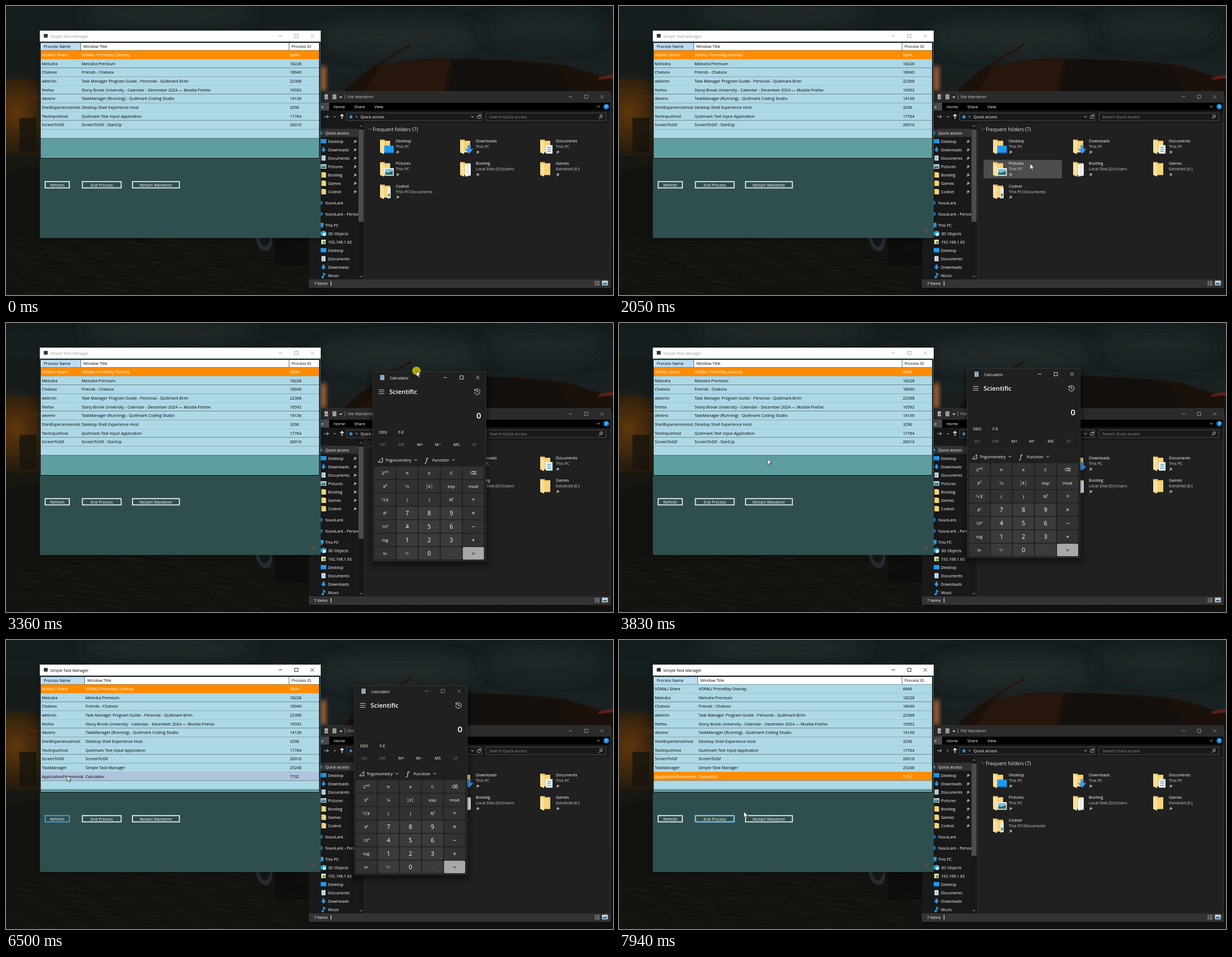
An HTML page that plays this animation: 1084 by 517 pixels, repeating every 8 s.

```html
<!DOCTYPE html>
<html lang="en">
<head>
<meta charset="utf-8">
<title>Simple Task Manager</title>
<style>
html, body { margin: 0; width: 100%; height: 100%; overflow: hidden; background: #0d1111; }
svg { display: block; width: 100vw; height: 100vh; }
text { font-family: "Open Sans", "Noto Sans", "DejaVu Sans", sans-serif; white-space: pre; }
.math { font-family: "Noto Serif", "DejaVu Sans", serif; font-style: italic; }
.row rect { fill: #add8e6; }
.row text { fill: #000; }
.row.hot rect { fill: #b0c4de; }
.row.sel rect { fill: #ff8c00; }
.row.sel text { fill: #fff; }
.btn .edge { fill: none; stroke: #e6eaea; stroke-width: 1.8; }
.btn .halo { fill: none; stroke: none; stroke-width: 1; }
.btn.focus .edge { stroke: #4aa0e6; }
.btn.hot .edge { stroke: #fff; }
.btn.hot .halo { stroke: #2f8fdf; }
.item > rect { fill: none; }
.item.hot > rect { fill: #4d4d4d; }
</style>
</head>
<body>
<svg id="stage" viewBox="0 0 1084 517" preserveAspectRatio="none">
<defs>
  <linearGradient id="sky" x2="0" y2="1">
    <stop offset="0" stop-color="#141c1d"/><stop offset=".22" stop-color="#1a2122"/>
    <stop offset=".55" stop-color="#171711"/><stop offset="1" stop-color="#11120f"/>
  </linearGradient>
  <radialGradient id="amber"><stop offset="0" stop-color="#8a4a0c" stop-opacity=".6"/><stop offset="1" stop-color="#8a4a0c" stop-opacity="0"/></radialGradient>
  <filter id="soft" x="-50%" y="-50%" width="200%" height="200%"><feGaussianBlur stdDeviation="4"/></filter>
  <filter id="haze" x="-50%" y="-100%" width="200%" height="300%"><feGaussianBlur stdDeviation="16"/></filter>
  <clipPath id="side"><rect x="541" y="209" width="88" height="280"/></clipPath>
</defs>
<g id="scene"></g>
</svg>
<script>
const R = (x, y, w, h, fill, more = '') => `<rect x="${x}" y="${y}" width="${w}" height="${h}" fill="${fill}" ${more}/>`;
const P = (d, fill, stroke = 'none', w = 1, more = '') => `<path d="${d}" fill="${fill}" stroke="${stroke}" stroke-width="${w}" ${more}/>`;
const C = (x, y, r, fill, more = '') => `<circle cx="${x}" cy="${y}" r="${r}" fill="${fill}" ${more}/>`;
const E = (x, y, rx, ry, fill, more = '') => `<ellipse cx="${x}" cy="${y}" rx="${rx}" ry="${ry}" fill="${fill}" ${more}/>`;
const T = (x, y, s, fill = '#fff', size = 7.2, more = '') =>
  `<text x="${x}" y="${y + size * .36}" font-size="${size}" fill="${fill}" ${more}>${s}</text>`;
const G = (s, more = '') => `<g ${more}>${s}</g>`;
const at = (x, y, s) => G(s, `transform="translate(${x} ${y})"`);
const line = (d, color, w = 1) => P(d, 'none', color, w);
const MID = 'text-anchor="middle"';

function wallpaper() {
  let s = R(0, 0, 1084, 517, 'url(#sky)');
  const haze = 'filter="url(#haze)"';
  s += E(290, 14, 160, 18, '#232b2b', haze) + E(700, 55, 150, 28, '#20292a', haze) + E(960, 40, 110, 30, '#1d2526', haze);
  s += R(0, 62, 62, 78, '#151b1a') + P('M0 132H62V268H0Z', '#241b0d');
  s += E(18, 190, 60, 75, 'url(#amber)');
  s += R(0, 160, 62, 6, '#4b2a0a', 'opacity=".6"') + R(24, 200, 30, 62, '#17140d', 'opacity=".8"');
  s += R(475, 36, 35, 8, '#1a2021') + R(561, 108, 10, 44, '#bd6a3a', 'filter="url(#soft)"');
  s += P('M603 153Q640 112 724 67L722 72Q690 88 668 108Q730 92 790 94Q940 96 1000 106L1084 132V160H603Z', '#1b110b');
  s += P('M668 108Q735 93 794 95L782 153H640Z', '#27160c') + P('M800 96Q930 97 985 110L1010 153H790Z', '#120f0c');
  s += line('M662 106L724 67L722 73', '#2d190d', 2) + P('M1058 128L1084 122V129L1058 132Z', '#5b2114');
  s += P('M0 300Q40 285 62 290V517H0Z', '#12130f') + P('M0 415H541V517H0Z', '#131410');
  // wet cobbles
  for (let i = 0; i < 70; i++) {
    const x = (i * 97) % 540 - 10, y = 418 + (i * 37) % 98;
    s += line(`M${x} ${y}q12 -5 24 0t22 1`, i % 2 ? '#1d1d17' : '#0b0d0b', 1.5);
  }
  s += E(460, 412, 15, 27, '#272c2e', 'transform="rotate(-12 460 412)"') + E(462, 410, 10, 20, '#141719');
  return s + R(480, 415, 62, 50, '#0b0b0a', 'opacity=".7"');
}

const caption = (xs, y, color, k = 3) =>
  line(`M${xs[0] - k} ${y}h${2 * k}M${xs[1] - k} ${y - k}h${2 * k}v${2 * k}h${-2 * k}ZM${xs[2] - k} ${y - k}l${2 * k} ${2 * k}m0 ${-2 * k}l${-2 * k} ${2 * k}`, color, .8);
const chevron = (x, y, color = '#ddd', k = 2.5) => line(`M${x - k} ${y - k / 2}l${k} ${k}l${k} ${-k}`, color);
const pin = (x, y) => at(x, y, P('M-1 -3L3 1L1 1L-1 3L-3 -1L-1 -1Z', '#aaa') + line('M-1 1L-3.5 3.5', '#aaa', .8));

const star = P('M0 -4L1.2 -1.3L4 -1L1.8 .8L2.6 4L0 2.3L-2.6 4L-1.8 .8L-4 -1L-1.2 -1.3Z', '#39a0ee');
const arrow = P('M-1.6 -4.5H1.6V-.5H4.5L0 4.5L-4.5 -.5H-1.6Z', '#3b9af0');
const screen = R(-5, -4, 10, 8, '#1e9bf0') + R(-5, 3, 10, 1, '#0d6bb5');
const page = R(-3.5, -4.5, 7, 9, '#eef4f8') + line('M-2 -2H2M-2 0H2M-2 2H2', '#4aa3d0', .9);
const photo = R(-5, -4, 10, 8, '#f2f6f8') + R(-4, -3, 8, 6, '#79bfe8') + P('M-4 3V0L-1 1L4 -1V3Z', '#35695a');
const dir = R(-4, -5, 6, 10, '#e3b64e') + R(-3, -4, 7.5, 9, '#fbdc83');
const icons = {
  star, arrow, screen, page, photo, dir,
  cloud: C(0, 0, 3.5, '#1582d8'),
  pc: R(-5, -4, 10, 7, '#3aa7e8') + R(-3, 4, 6, 1, '#bbb'),
  cube: P('M0 -5L5 -3V3L0 5L-5 3V-3Z', '#31b3e3') + R(-1, -1, 5, 5, '#eaf7fc'),
  server: R(-4, -4, 8, 8, '#f3e5ad') + C(1, 1, 2.5, '#49ae57'),
  note: C(-1.5, 3, 2, '#2aa4ee') + line('M0 3V-4Q3 -3 3 0', '#2aa4ee', 1.6)
};

const sidebar = [
  ['Quick access', 'star', 227, 1], ['Desktop', 'screen', 242, 2, 1], ['Downloads', 'arrow', 257, 2, 1],
  ['Documents', 'page', 272, 2, 1], ['Pictures', 'photo', 287, 2, 1], ['Bootleg', 'dir', 302, 2, 1],
  ['Games', 'dir', 317, 2, 1], ['Codnel', 'dir', 332, 2, 1], ['NuvoLark', 'cloud', 352, 1],
  ['NuvoLark - Personal', 'cloud', 372, 1], ['This PC', 'pc', 392, 1], ['3D Objects', 'cube', 407, 2],
  ['192.168.1.62', 'server', 422, 2], ['Desktop', 'screen', 437, 2], ['Documents', 'page', 452, 2],
  ['Downloads', 'arrow', 467, 2], ['Music', 'note', 482, 2]
];
const folders = [
  ['Desktop', 'This PC', 'screen'], ['Downloads', 'This PC', 'arrow'], ['Documents', 'This PC', 'page'],
  ['Pictures', 'This PC', 'photo'], ['Bootleg', 'Local Disk (D:)\\Users', 'blank'], ['Games', 'Extrahdd (E:)', ''],
  ['Codnel', 'This PC\\Documents', 'files']
];
const cols = [651, 794, 937];

function bigFolder(kind) {
  let s = P('M-12 -13H-4L-3 -11H6V10H-12Z', '#e9bf5c') + P('M-12 -13L-5 -9V13L-12 10Z', '#fbe09a') + P('M-5 -9L6 -11V10H-5Z', '#f6d37a');
  if (kind === 'blank') s += P('M-3 -8L7 -10V11L-3 13Z', '#f4f4f2') + line('M2 -9V12', '#ccc', .8);
  else if (kind === 'files') s += P('M1 -6L7 -8V11L1 12Z', '#e9edf0') + R(2, 3, 4, 5, '#5f9b80');
  else if (kind) s += G(icons[kind], 'transform="translate(4 4.5) scale(1.7)"');
  return s;
}

function fileWindow() {
  let s = R(541.5, 153, 538, 350.5, '#202020', 'stroke="#3a3a3a"');
  s += R(542, 153, 537, 20, '#2b2b2b') + R(542, 173, 537, 14, '#000') + R(542, 187, 537, 22, '#191919');
  s += R(569, 158, 6, 9, '#ababab') + line('M570.5 163l1.5 1.5l2.5 -3', '#444') + R(583, 158, 7, 9, '#999');
  s += P('M595.5 162h5l-2.5 3Z', '#ddd') + line('M605.5 158v9', '#777') + T(610, 162.5, 'File Wanderer', '#c8c8c8');
  s += caption([1008, 1036, 1064], 162.5, '#a5a5a5');
  s += R(542, 173, 35, 14, '#4a4a4a') + T(563, 180, 'e');
  s += T(585, 180, 'Home') + T(622, 180, 'Share') + T(658, 180, 'View');
  s += chevron(1058, 180) + C(1072, 180, 5, '#1683d8') + T(1072, 180, '?', '#fff', 7.5, MID + ' font-weight="700"');
  s += line('M568 198h8m-3 -3l3 3l-3 3', '#ccc') + chevron(587, 198, '#ccc', 2) + line('M600 202v-8m-3 3l3 -3l3 3', '#fff', 1.3);
  s += R(608.5, 191.5, 241, 13.5, '#191919', 'stroke="#4d4d4d"') + at(616, 198, star) + line('M625 196l2 2l-2 2', '#ddd') + T(633, 198, 'Quick access');
  s += chevron(833, 198) + line('M847 196.5a3 3 0 1 0 .5 2.5M847.5 194v3h-3', '#ccc');
  s += R(857.5, 191.5, 214, 13.5, '#191919', 'stroke="#4d4d4d"') + T(863, 198, 'Search Quick access', '#929292');
  s += C(1063, 197, 2.3, 'none', 'stroke="#ccc"') + line('M1061.5 199l-3 3', '#ccc');

  let side = R(541, 209, 88, 280, '#191919') + R(541, 219.5, 88, 14.5, '#333');
  for (const [name, icon, y, level, pinned] of sidebar) {
    side += at(level === 1 ? 562 : 567, y, icons[icon]) + T(level === 1 ? 570 : 575, y, name);
    if (pinned) side += pin(624, y);
  }
  s += G(side, 'clip-path="url(#side)"');
  s += R(629, 209, 10, 280, '#171717') + R(629.5, 221, 9, 165, '#4d4d4d') + line('M631.5 216l2.5 -2.5l2.5 2.5', '#aaa') + chevron(634, 484, '#aaa');
  s += line('M640.5 209v280', '#2d2d2d') + chevron(650, 220.5, '#777', 3) + T(655, 221, 'Frequent folders (7)', '#e6e6e6', 8.8);
  folders.forEach(([name, place, kind], i) => {
    const x = cols[i % 3], y = 235 + 40.3 * Math.floor(i / 3), tx = x + 45;
    s += G(R(x, y, 140, 33, '') + at(x + 29, y + 17, bigFolder(kind)) +
      T(tx, y + 6.5, name) + T(tx, y + 16.5, place, '#d0d0d0') + pin(tx + 4, y + 26), 'class="item"');
  });
  s += R(542, 489, 537, 14, '#333') + T(550, 496, '7 items') + line('M580.5 492v8', '#fff');
  s += line('M1051 493h3m1 0h5M1051 496h3m1 0h5M1051 499h3m1 0h5', '#ccc') + R(1065, 492, 9, 7, '#8ecbee', 'stroke="#fff"') + R(1066, 496, 7, 2, '#346');
  return s;
}

const tasks = [
  ['VORALI Share', 'VORALI PrimeRay Overlay', 6664], ['Melodra', 'Melodra Premium', 18228],
  ['Chatvox', 'Friends - Chatvox', 18040], ['wbbrim', 'Task Manager Program Guide - Personal - Quillmark Brim', 22368],
  ['firefox', 'Stony Brook University - Calendar - December 2024 — Mozilla Firefox', 16592],
  ['devenv', 'TaskManager (Running) - Quillmark Coding Studio', 14136],
  ['ShellExperienceHost', 'Desktop Shell Experience Host', 3296],
  ['TextInputHost', 'Quillmark Text Input Application', 17764], ['ScreenToGif', 'ScreenToGif - StartUp', 26016]
];
const refreshed = [...tasks.slice(0, 8), ['ScreenToGif', 'ScreenToGif', 26016],
  ['TaskManager', 'Simple Task Manager', 25248], ['ApplicationFrameHost', 'Calculator', 7732]];
const TOP = 79.5, PITCH = 15.66;

function table(rows, split, id) {
  let s = R(61.5, 65.5, 498, 207, '#5f9ea0', 'stroke="#111"') + R(62, 66, 497, 13.5, '#fff') + R(63, 66, split - 63, 13.5, '#bcdcf4');
  s += T(67.5, 72.5, 'Process Name', '#000') + T(split + 5, 72.5, 'Window Title', '#000') + T(510, 72.5, 'Process ID', '#000');
  s += line(`M${split + .5} 66v13M505.5 66v13M62 79.5h497`, '#3a4a50', .8);
  [...rows, ['', '', '']].forEach(([name, title, pid], i) => {
    const y = TOP + PITCH * i, m = y + 8;
    s += G(R(62, y, 497, PITCH, '') + T(64, m, name) + T(split + 2, m, title) + T(507, m, pid) +
      line(`M62 ${Math.floor(y + PITCH) + .5}h497`, '#5e737b'), 'class="row"');
  });
  return G(s, `id="${id}"`);
}

const buttons = [['Refresh', 69, 45], ['End Process', 135.5, 71], ['Restart Wanderer', 225, 85.5]];
function taskWindow() {
  let s = R(60, 46, 503, 371, '#000', 'opacity=".25" filter="url(#soft)"') + R(60.5, 44, 501.5, 371, '#2f4f4f') + R(60.5, 44, 501.5, 19.5, '#fff');
  s += R(67.5, 50, 7, 6.5, '#333');
  for (const [id, color] of [['idle', '#999'], ['active', '#000']])
    s += G(T(79, 54, 'Simple Task Manager', color, 6.95) + caption([490, 518.5, 547], 53.5, color), `id="${id}"`);
  s += table(tasks, 133, 'before') + table(refreshed, 140, 'after');
  for (const [name, x, w] of buttons)
    s += G(R(x + .9, 314.2, w - 1.8, 11.2, '', 'class="edge"') + R(x + .5, 313.8, w - 1, 12, '', 'class="halo"') +
      T(x + w / 2, 320, name, '#fff', 7.1, MID), 'class="btn"');
  return s;
}

const sup = (a, b) => `${a}<tspan dy="-2.5" font-size="5.5">${b}</tspan>`;
const frac = (a, b) => `<tspan dy="-1.5" font-size="6">${a}</tspan><tspan dy="1.5">⁄</tspan><tspan font-size="6">${b}</tspan>`;
const keys = [sup('2', 'nd'), 'π', 'e', 'C', '⌫', sup('x', '2'), frac('1', 'x'), '|x|', 'exp', 'mod',
  '<tspan dy="-2" font-size="5">2</tspan><tspan dy="2">√x</tspan>', '(', ')', 'n!', '÷', sup('x', 'y'), 7, 8, 9, '×', sup('10', 'x'), 4, 5, 6, '−',
  'log', 1, 2, 3, '+', 'ln', frac('+', '−'), 0, '.', '='];
const mathKeys = [5, 7, 10, 13, 15];

function calculator() {
  let s = R(-4, 2, 210, 346, '#000', 'opacity=".4" filter="url(#soft)"') + R(0, 0, 201.5, 338.5, '#202020', 'stroke="#3c3c3c" stroke-width=".8"');
  s += R(13, 6, 7, 9, '#c5d3dc') + R(14, 7, 5, 2, '#2b8fd6') + line('M14 11h5M14 13h5', '#567', 1);
  s += T(30, 11, 'Calculator') + G(caption([129, 158, 187], 10.5, '#fff'), 'id="calcCaption"');
  s += line('M10 32.5h10M10 36h10M10 39.5h10', '#ddd', .9) + T(29, 36, 'Scientific', '#fff', 11.5, 'font-weight="600"');
  s += line('M182 33a5 5 0 1 1 -1 3M181.5 31v3h3M186 33v3.5h2.5', '#ddd', 1);
  s += T(193, 78.5, '0', '#fff', 15, 'text-anchor="end" font-weight="600"') + T(10.5, 108.5, 'DEG') + T(45, 108.5, 'F-E');
  ['MC', 'MR', 'M+', 'M−', 'MS', 'M˅'].forEach((k, i) => s += T([18, 50.5, 84, 116, 149, 182][i], 130, k, i < 2 || i > 4 ? '#777' : '#fff', 7.5, MID));
  s += line('M1 144.5h199', '#292929') + line('M9 162h8v-8Z', '#ddd') + T(22, 158, 'Trigonometry', '#fff', 7.4) + chevron(76, 158);
  s += T(93, 158, 'ƒ', '#fff', 10, 'class="math"') + T(106, 158, 'Function', '#fff', 7.4) + chevron(143.5, 158);
  keys.forEach((k, i) => {
    const c = i % 5, r = Math.floor(i / 5), x = 21.5 + 39.4 * c, y = 181 + 24 * r;
    const digit = r > 2 && c > 0 && c < 4, last = i === 34;
    s += R(x - 18.9, y - 11.2, 37.8, 22.4, last ? '#a8a8a8' : digit ? '#3b3b3b' : '#323232', 'rx="2"');
    const size = typeof k === 'number' ? 10.5 : c === 4 && r > 1 ? 11 : 8;
    s += T(x, y, k, last ? '#222' : '#fff', size, MID + (mathKeys.includes(i) ? ' class="math"' : ''));
  });
  return G(s, 'id="calc"');
}

const ARROW = 'M0 0V10.5L2.5 8.2L4.2 12L5.9 11.2L4.2 7.5H7.6Z';
document.getElementById('scene').innerHTML = wallpaper() + fileWindow() + taskWindow() +
  G(P(ARROW, '#6d4640'), 'id="ghost" transform="translate(546 396)" opacity=".8"') + calculator() +
  C(0, 0, 7.6, '#e6d200', 'id="press" opacity=".75"') + P(ARROW, '#fff', '#111', .7, 'id="cursor"');

const $ = id => document.getElementById(id);
const all = q => [...document.querySelectorAll(q)];
const show = (id, on) => $(id).style.display = on ? '' : 'none';
const move = (id, [x, y]) => $(id).setAttribute('transform', `translate(${x} ${y})`);

// [time, x, y]
const pointerPath = [
  [70, 945, 512], [400, 770, 432], [810, 546, 396], [880, 546, 396], [1150, 1, 514], [1560, 1, 514],
  [2050, 734, 282], [2330, 752, 190], [2600, 752, 108], [3140, 749, 92], [3210, 749, 92], [3360, 733, 85.5],
  [3560, 699, 91], [3830, 265, 243], [4030, 265, 243], [4720, 166, 321], [4920, 166, 321], [5400, 93, 318],
  [5740, 93, 318], [6500, 109, 242.5], [6570, 109, 242.5], [7320, 171, 318], [7390, 171, 318], [7530, 172, 319],
  [7730, 172, 319], [7940, 223, 307]
];
const calcPath = [[3210, 672, 82], [3360, 655.5, 87], [3560, 622, 81]];
const clicks = [[3210, 3560], [4060, 4180], [5600, 5720], [6570, 6680], [7230, 7320]];

function along(path, t) {
  const i = path.findIndex(p => p[0] > t);
  if (i < 0) return path[path.length - 1].slice(1);
  if (i === 0) return path[0].slice(1);
  const [t0, x0, y0] = path[i - 1], [t1, x1, y1] = path[i];
  const u = (t - t0) / (t1 - t0), e = u * u * (3 - 2 * u);
  return [x0 + (x1 - x0) * e, y0 + (y1 - y0) * e];
}

const rowSets = [all('#before .row'), all('#after .row')];
const btns = all('.btn'), items = all('.item');

function draw(t) {
  const [x, y] = along(pointerPath, t);
  const active = t >= 4100, fresh = t >= 5740, calcOpen = t >= 2460 && t < 7860;
  move('cursor', [x, y]);
  move('press', [x, y]);
  move('calc', along(calcPath, t));
  show('cursor', t >= 70 && (t < 1150 || t >= 1560));
  show('press', clicks.some(([a, b]) => t >= a && t < b));
  show('ghost', t >= 880);
  show('calc', calcOpen);
  show('idle', !active);
  show('active', active);
  show('before', !fresh);
  show('after', fresh);
  $('calcCaption').setAttribute('opacity', active ? .55 : 1);

  const selected = t >= 6620 ? 10 : 0;
  const overRow = x > 62 && x < 559 ? Math.floor((y - TOP) / PITCH) : -1;
  rowSets[+fresh].forEach((row, i) => row.setAttribute('class', 'row' + (i === selected ? ' sel' : i === overRow ? ' hot' : '')));

  const focus = !active ? -1 : t < 5700 ? 1 : t < 7300 ? 0 : 1;
  btns.forEach((b, i) => {
    const [, bx, w] = buttons[i];
    const over = x >= bx && x < bx + w && y > 313 && y < 327;
    const hot = over || (i === 1 && t > 7300);
    b.setAttribute('class', 'btn' + (i === focus ? ' focus' : '') + (hot ? ' hot' : ''));
  });
  items.forEach((el, i) => {
    const dx = x - cols[i % 3], dy = y - 235 - 40.3 * Math.floor(i / 3);
    el.setAttribute('class', 'item' + (!calcOpen && dx > 0 && dx < 140 && dy > 0 && dy < 33 ? ' hot' : ''));
  });
}

const start = performance.now();
(function tick() {
  draw((performance.now() - start) % 8000);
  requestAnimationFrame(tick);
})();
</script>
</body>
</html>
```
